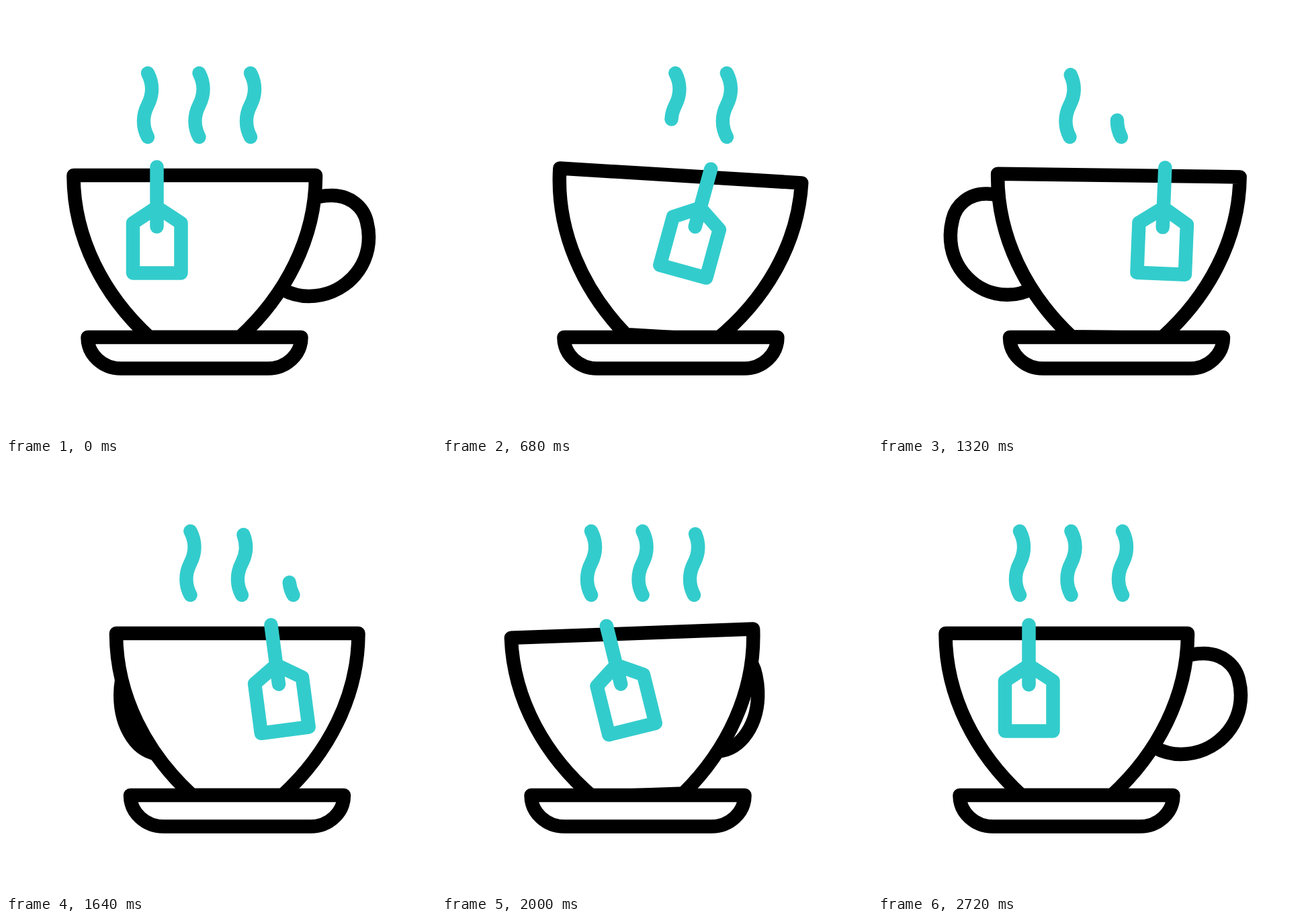
An HTML page for the animation above (3 s loop, 640 by 640 pixels).

```html
<!DOCTYPE html>
<html lang="en">
<head>
<meta charset="utf-8">
<title>Tea cup</title>
<style>
  html, body { margin: 0; width: 100%; height: 100%; overflow: hidden; background: #fff; }
  svg { display: block; width: 100vw; height: 100vh; }
  path {
    stroke-width: 20.5; stroke-linecap: round; stroke-linejoin: round;
    fill: none; vector-effect: non-scaling-stroke;
  }
  .ink { stroke: #000; }
  .solid { fill: #fff; }
  .teal { stroke: #3cc; }
  .wisp { vector-effect: none; }
</style>
</head>
<body>
<svg viewBox="0 0 640 640">
  <g id="scene">
    <g id="steam"></g>
    <g id="cup">
      <path id="handle" class="ink" d="M455 288Q465 282 485 282C512 282 532 299 537 321Q540 333 540 344C540 393 500 432 451 432Q430 432 412 422"/>
      <path class="ink solid" d="M100.5 252H461C461 346 415.5 431 348 493H213.5C146 431 100.5 346 100.5 252Z"/>
    </g>
    <path class="ink solid" d="M121.5 493H439.5C439.5 519 417 539.5 390 539.5H171C144 539.5 121.5 519 121.5 493Z"/>
    <path id="tag" class="teal" d="M0 0V89M0 60L36 83.5V158H-35.5V83.5Z"/>
  </g>
</svg>
<script>
const LOOP = 3000, STEP = 40;
const MID = 280.5, BASE = 493;
const $ = id => document.getElementById(id);

// Eased 0 to 1, beginning at start and lasting dur
function ramp(t, start, dur) {
  const p = Math.min(1, Math.max(0, (t - start) / dur));
  return p * p * (3 - 2 * p);
}

const hop = (t, start, rise, fall) => ramp(t, start, rise) - ramp(t, start + rise, fall);

// A strong rock and a weaker, slower one
const wobble = (t, start, beat) =>
  6.7 * hop(t, start, beat, beat) + 2.9 * hop(t, start + 2 * beat, beat, 2.5 * beat);

const swing = (t, start, release) => 11.8 * (ramp(t, start, 300) - ramp(t, release, 570));

const wisps = [0, 1, 2].map(i => {
  const x = 211 + 76.5 * i;
  const el = document.createElementNS('http://www.w3.org/2000/svg', 'path');
  el.setAttribute('class', 'teal wisp');
  el.setAttribute('pathLength', 1);
  el.setAttribute('d', `M${x} 195C${x - 8} 180 ${x - 8} 163 ${x} 147.5S${x + 8} 115 ${x} 100`);
  $('steam').append(el);
  return el;
});

// Each wisp leaves upward, then grows again from its root
function drawWisp(el, i, t) {
  const regrow = 763 + 350 * i;
  const from = t < regrow ? ramp(t, 180 + 335 * i, 475) : 0;
  const to = t < regrow ? 1 : ramp(t, regrow, 617);
  el.style.display = to - from > 0.002 ? '' : 'none';
  el.setAttribute('stroke-dasharray', `${to - from} 3`);
  el.setAttribute('stroke-dashoffset', -from);
}

function draw(t) {
  const turn = ramp(t, 100, 810) - ramp(t, 1470, 700);
  const tilt = wobble(t, 601, 154) - wobble(t, 1949, 137);
  const sway = swing(t, 120, 880) - swing(t, 1463, 2120);
  const lean = `rotate(${tilt} ${MID} ${BASE})`;

  $('scene').setAttribute('transform', `translate(${74.5 * turn})`);
  $('cup').setAttribute('transform', lean);
  $('handle').setAttribute('transform',
    `translate(${MID}) scale(${1 - 1.96 * turn} 1) translate(${-MID})`);
  $('tag').setAttribute('transform',
    `${lean} translate(${224.5 + 125 * turn} 239.5) rotate(${sway})`);
  wisps.forEach((el, i) => drawWisp(el, i, t));
}

const start = performance.now();
function tick() {
  const t = (performance.now() - start) % LOOP;
  draw(Math.floor(t / STEP) * STEP);
  requestAnimationFrame(tick);
}
tick();
</script>
</body>
</html>
```
